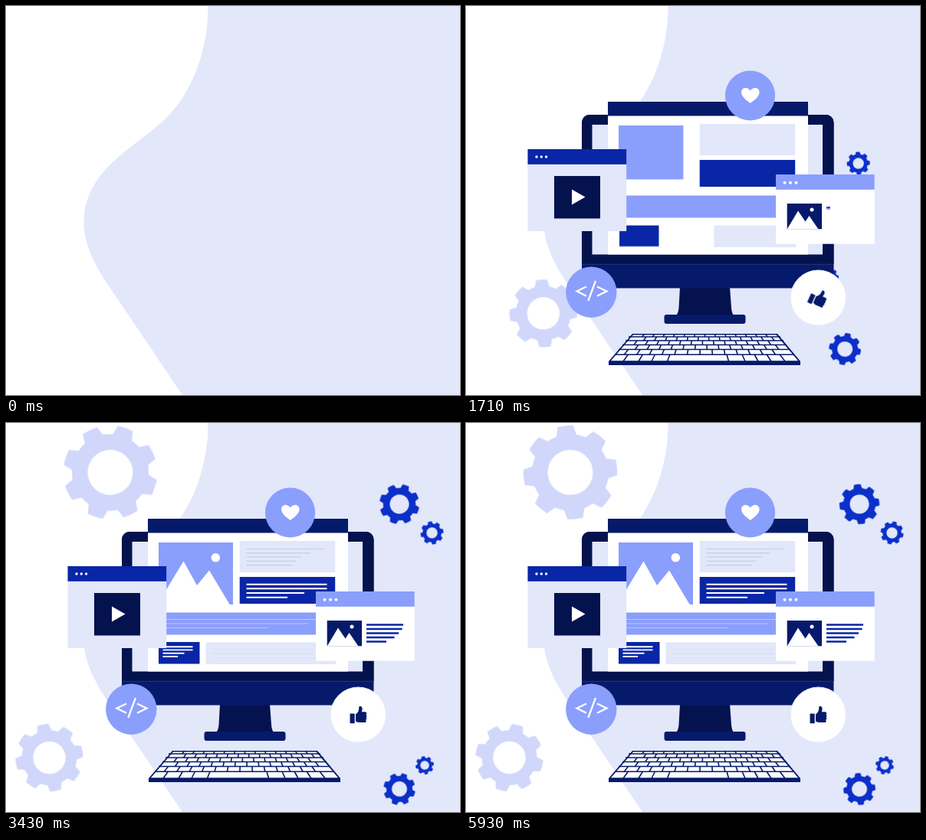
Animation, 592 px wide and 508 px high, one loop 6000 ms. Source, as an HTML page without scripts:

```html
<!DOCTYPE html>
<html lang="en">
<head>
<meta charset="utf-8">
<title>Web design workspace</title>
<style>
html, body { margin: 0; width: 100%; height: 100%; overflow: hidden; background: #fff; }
svg { display: block; }
.ink { fill: #04124e; }
.navy { fill: #061a6b; }
.blue { fill: #0926a6; }
.sky { fill: #8a9efc; }
.mist { fill: #e2e7fa; }
.white { fill: #fff; }
.pale { fill: #d0d7fb; }
.royal { fill: #0b2fc9; }

/* every part shares one 6s clock */
.an, .lines > * { animation: 6s linear infinite both; }
.box { transform-box: fill-box; transform-origin: center; }
.left { transform-origin: left; }
.right { transform-origin: right; }
.top { transform-origin: 0 0; }
.foot { transform-origin: bottom; }

.keys { animation-name: keys; animation-timing-function: ease-out; }
.monitor { animation-name: monitor; animation-timing-function: ease-in-out; transform-origin: 315px 414px; }
.page { animation-name: page; transform-origin: 315.5px 324.5px; }
.video { animation-name: video; }
.card { animation-name: card; transform-origin: 404px 310.5px; }
.heart { animation-name: heart; }
.pop { animation-name: pop; }
.tilt { animation-name: tilt; }
.bar { animation-name: bar; }
.bar2 { animation-name: bar2; }
.pic { animation-name: pic; }
.tile { animation-name: tile; }
.rise { animation-name: rise; animation-timing-function: ease-out; }
.sun { animation-name: sun; }

@keyframes keys { 0%, 1% { opacity: 0; transform: translateY(18px); } 6.5%, to { opacity: 1; transform: none; } }
@keyframes monitor { 0%, 5% { transform: scale(0); } 14.3%, to { transform: scale(1); } }
@keyframes page { 0%, 13% { transform: scale(0); } 18%, to { transform: scale(1); } }
@keyframes video {
  0%, 14.8% { opacity: 0; transform: translateX(40px); }
  15.5% { opacity: .03; }
  22.3%, to { opacity: 1; transform: none; }
}
@keyframes card { 0%, 15.3% { transform: scaleY(0); } 21.5%, to { transform: scaleY(1); } }
@keyframes heart { 0%, 13.2% { transform: scale(0); } 18% { transform: scale(1.29); } 21.3%, to { transform: scale(1); } }
@keyframes pop { 0%, 21.7% { transform: scale(0); } 25% { transform: scale(1.15); } 27%, to { transform: scale(1); } }
@keyframes tilt { 0%, 26.5% { transform: rotate(0deg); } 28.5% { transform: rotate(24deg); } 31%, to { transform: rotate(0deg); } }
@keyframes bar { 0%, 21.5% { transform: scaleX(0); } 26.7%, to { transform: scaleX(1); } }
@keyframes bar2 { 0%, 26% { transform: scaleX(0); } 30%, to { transform: scaleX(1); } }
@keyframes pic { 0%, 23.3% { transform: scale(0); } 29.3%, to { transform: scale(1); } }
@keyframes tile { 0%, 21.7% { transform: scale(0); } 28.8%, to { transform: scale(1); } }
@keyframes rise { 0%, 30.5% { transform: scaleY(0); } 35%, to { transform: scaleY(1); } }
@keyframes sun { 0%, 32% { transform: scale(0); } 36%, to { transform: scale(1); } }

/* text lines, one after another */
.lines { fill: none; --b: .09s; }
.lines > * {
  animation-name: grow; animation-delay: calc(var(--b) + var(--n, 0) * .1s);
  transform-box: fill-box; transform-origin: left;
}
.lines > :nth-child(2) { --n: 1; }
.lines > :nth-child(3) { --n: 2; }
.lines > :nth-child(4) { --n: 3; }
.lines > :nth-child(5) { --n: 4; }
@keyframes grow { 0%, 28.3% { transform: scaleX(0); } 30.5%, to { transform: scaleX(1); } }

/* gears slide from --a to --z at size --s while turning */
.gear { animation-timing-function: ease-out; }
.cw, .ccw { animation: cw 6s linear infinite; }
.ccw { animation-name: ccw; }
@keyframes cw { from { transform: rotate(6deg); } to { transform: rotate(606deg); } }
@keyframes ccw { from { transform: rotate(2deg); } to { transform: rotate(-598deg); } }
.go1 { animation-name: go1; }
.go2 { animation-name: go2; }
.go3 { animation-name: go3; }
.go4 { animation-name: go4; }
.go5 { animation-name: go5; animation-timing-function: ease-in-out; }
@keyframes go1 {
  0%, 22.7% { opacity: 0; transform: translate(var(--a)) scale(var(--s)); }
  22.8% { opacity: 1; }
  34.2%, to { opacity: 1; transform: translate(var(--z)) scale(var(--s)); }
}
@keyframes go2 {
  0%, 25.4% { opacity: 0; transform: translate(var(--a)) scale(var(--s)); }
  25.5% { opacity: 1; }
  34.3%, to { opacity: 1; transform: translate(var(--z)) scale(var(--s)); }
}
@keyframes go3 {
  0%, 27.4% { opacity: 0; transform: translate(var(--a)) scale(var(--s)); }
  27.5% { opacity: 1; }
  35.9%, to { opacity: 1; transform: translate(var(--z)) scale(var(--s)); }
}
@keyframes go4 {
  0%, 28.1% { opacity: 0; transform: translate(var(--a)) scale(var(--s)); }
  28.2% { opacity: 1; }
  34.3%, to { opacity: 1; transform: translate(var(--z)) scale(var(--s)); }
}
@keyframes go5 {
  0%, 31% { opacity: 0; transform: translate(var(--a)) scale(var(--s)); }
  31.1% { opacity: 1; }
  39.5%, to { opacity: 1; transform: translate(var(--z)) scale(var(--s)); }
}
</style>
</head>
<body>
<svg width="592" height="508" viewBox="0 0 592 508">
  <defs>
    <path id="tooth" d="M-13.5 -47L-10.2 -60.6Q0 -62 10.2 -60.6L13.5 -47Z"/>
    <g id="gear">
      <path fill-rule="evenodd" d="M-50 0a50 50 0 1 1 100 0a50 50 0 1 1 -100 0ZM-29.5 0a29.5 29.5 0 1 0 59 0a29.5 29.5 0 1 0 -59 0Z"/>
      <use href="#tooth"/>
      <use href="#tooth" transform="rotate(45)"/>
      <use href="#tooth" transform="rotate(90)"/>
      <use href="#tooth" transform="rotate(135)"/>
      <use href="#tooth" transform="rotate(180)"/>
      <use href="#tooth" transform="rotate(225)"/>
      <use href="#tooth" transform="rotate(270)"/>
      <use href="#tooth" transform="rotate(315)"/>
    </g>
    <!-- key gaps meet at one vanishing point; skewX shifts a whole row -->
    <path id="fan" d="M0 0L-105 144M0 0L-87.5 144M0 0L-70 144M0 0L-52.5 144M0 0L-35 144M0 0L-17.5 144M0 0V144M0 0L17.5 144M0 0L35 144M0 0L52.5 144M0 0L70 144M0 0L87.5 144M0 0L105 144"/>
  </defs>

  <path class="mist" d="M263.5 0C264 60 240 118 205 150C165 187 101.5 215 101.5 283C101.5 312 117 340 133 364L230 508H592V0Z"/>

  <g class="pale">
    <g class="an gear go5" style="--a:216px,192px;--z:136px,64.5px;--s:1"><use class="ccw" href="#gear"/></g>
    <g class="an gear go1" style="--a:200px,322px;--z:56.5px,437px;--s:.72"><use class="cw" href="#gear"/></g>
  </g>
  <g class="royal">
    <g class="an gear go4" style="--a:475px,268px;--z:513px,106px;--s:.425"><use class="ccw" href="#gear"/></g>
    <g class="an gear go2" style="--a:466px,270px;--z:555.5px,143.5px;--s:.245"><use class="cw" href="#gear"/></g>
    <g class="an gear go1" style="--a:452px,381px;--z:513px,478px;--s:.34"><use class="ccw" href="#gear"/></g>
    <g class="an gear go3" style="--a:455px,330px;--z:546px,447px;--s:.195"><use class="cw" href="#gear"/></g>
  </g>

  <g class="an monitor">
    <path class="ink" d="M279 367H344L346 394Q346.5 401 349 404H274Q277 401 277.500 394Z"/>
    <rect class="navy" x="258.500" y="403" width="106" height="12" rx="3"/>
    <rect class="navy" x="151" y="142" width="328.500" height="226.500" rx="10"/>
    <path class="ink" d="M151 337V152a10 10 0 0 1 10-10H469.500a10 10 0 0 1 10 10V337Z"/>
    <path stroke="#33467f" stroke-width=".7" d="M151 337.300H479.500"/>
    <rect class="mist" x="164.500" y="155" width="300.500" height="169.500"/>
  </g>

  <g class="an keys">
    <path class="navy" d="M217 428H406L436 464V469H186V464Z"/>
    <path class="white" d="M218 429.500H404.500L433 463.300H189Z"/>
    <g stroke="#061a6b" stroke-width="1.600" fill="none">
      <path d="M212 432H410M208 437H414M204 442.500H418M199 448.500H423M194 455.200H428"/>
      <svg y="429" width="592" height="3" viewBox="0 429 592 3"><use href="#fan" transform="translate(311.500 320)"/></svg>
      <svg y="432" width="592" height="5" viewBox="0 432 592 5"><use href="#fan" transform="translate(311.500 320) skewX(2.600)"/></svg>
      <svg y="437" width="592" height="5.500" viewBox="0 437 592 5.500"><use href="#fan" transform="translate(311.500 320) skewX(-1.500)"/></svg>
      <svg y="442.500" width="592" height="6" viewBox="0 442.500 592 6"><use href="#fan" transform="translate(311.500 320) skewX(1.200)"/></svg>
      <svg y="448.500" width="592" height="6.700" viewBox="0 448.500 592 6.700"><use href="#fan" transform="translate(311.500 320) skewX(-2.800)"/></svg>
      <path d="M211.500 455L205 464M230.500 455L225 464M246.500 455L242 464M266 455L262.500 464M340 455L342.500 464M360 455L364 464M376 455L381 464M392 455L398 464M409 455L416 464"/>
    </g>
  </g>

  <g class="an page">
    <rect class="white" x="185" y="125" width="261" height="199.500"/>
    <rect class="navy" x="185" y="125" width="261" height="18.500"/>
    <rect class="sky an box top pic" x="199" y="156" width="97" height="81"/>
    <path class="white an box foot rise" d="M197 237.500L231.500 180.500L249 212L265 192.500L292 237.500Z"/>
    <circle class="white an box sun" cx="273.300" cy="175.800" r="5.800"/>
    <rect class="mist an box left bar" x="304.700" y="154" width="124.500" height="41"/>
    <rect class="blue an box left bar" x="304.700" y="201" width="124.500" height="35"/>
    <rect class="sky an box left bar" x="199" y="247.500" width="231" height="29"/>
    <rect class="blue an box tile" x="199" y="286" width="53.500" height="28.500"/>
    <rect class="mist an box right bar2" x="260.500" y="286.500" width="169.500" height="28.500"/>
    <g class="lines" stroke="#c3cbee" stroke-width="1.200">
      <path d="M313.500 164.500h101.500"/><path d="M313.500 169.800h83"/><path d="M313.500 175h72.500"/><path d="M313.500 180.300h65"/><path d="M313.500 185.600h59.500"/>
    </g>
    <g class="lines" stroke="#fff" stroke-width="1.900">
      <path d="M313.500 210.800h105"/><path d="M313.500 216.300h105"/><path d="M313.500 222h75.500"/><path d="M313.500 227.800h53.500"/>
    </g>
    <g class="lines" stroke="#b9c4fd">
      <path d="M204 256.500h216"/><path d="M204 262h190.500"/><path d="M204 267.500h138"/>
    </g>
    <g class="lines" stroke="#fff" stroke-width="1.900">
      <path d="M204.500 292.300h39"/><path d="M204.500 296.400h39"/><path d="M204.500 300.700h28"/><path d="M204.500 305h19.500"/>
    </g>
    <g class="lines" stroke="#d9dff5">
      <path d="M268 295.500h152"/><path d="M268 301h152"/><path d="M268 306.500h136"/>
    </g>
  </g>

  <g class="an video">
    <rect class="mist" x="80.500" y="187" width="128.700" height="107"/>
    <rect class="blue" x="80.500" y="187" width="128.700" height="19.800"/>
    <g class="white"><circle cx="92" cy="197" r="1.700"/><circle cx="98.300" cy="197" r="1.700"/><circle cx="104.600" cy="197" r="1.700"/></g>
    <rect class="ink" x="115" y="222" width="60" height="55.500"/>
    <path class="white" d="M138 239.500V259.500L155.500 249.500Z"/>
  </g>

  <g class="an card">
    <rect class="white" x="404" y="220" width="128.700" height="90.700"/>
    <rect class="sky" x="404" y="220" width="128.700" height="19.800"/>
    <g class="white"><circle cx="415.500" cy="230.800" r="2"/><circle cx="423" cy="230.800" r="2"/><circle cx="430.500" cy="230.800" r="2"/></g>
    <rect class="navy" x="418.700" y="258" width="45.300" height="33.300"/>
    <path class="white" d="M418.700 291.500L433 267.500L442.500 281.500L447.500 274L459.500 291.500Z"/>
    <circle class="white" cx="451" cy="266" r="2.500"/>
    <g class="lines" style="--b:0s" stroke="#0926a6" stroke-width="2.500">
      <path d="M470 263.500h48"/><path d="M470 269h46.500"/><path d="M470 274.500h42"/><path d="M470 280h36.500"/><path d="M470 285.500h26"/>
    </g>
  </g>

  <g class="an box heart">
    <circle class="sky" cx="370.500" cy="117" r="32.600"/>
    <path class="white" d="M370.800 127C366 123.500 359 118.500 359 112.500C359 106 367.500 105 370.800 110.500C374 105 382.600 106 382.600 112.500C382.600 118.500 375.500 123.500 370.800 127Z"/>
  </g>

  <g class="an box pop">
    <circle class="sky" cx="163.300" cy="373.700" r="33.200"/>
    <path fill="none" stroke="#fff" stroke-width="2.300" d="M157 366.500L144.500 372.500L157 378.700M169 359L159.300 385M171 366.500L183.500 372.500L171 378.700"/>
  </g>

  <g class="an box pop">
    <circle class="white" cx="459.300" cy="381" r="36" stroke="#eceffb" stroke-width="1"/>
    <g class="navy an box tilt">
      <rect x="448.500" y="379.500" width="6.200" height="12.700" rx=".8"/>
      <path d="M456 380.500C459 378.500 460.300 375.500 460.300 371C460.300 369 464.600 369.300 464.600 373.300C464.600 375 464.200 376.200 463.700 377.300H468.300a2 2 0 0 1 1 3.700a2 2 0 0 1 .2 3.500a2 2 0 0 1 -.5 3.400a1.800 1.800 0 0 1 -1.700 3.100H461Q458 391 456 389.500Z"/>
    </g>
  </g>
</svg>
</body>
</html>
```
